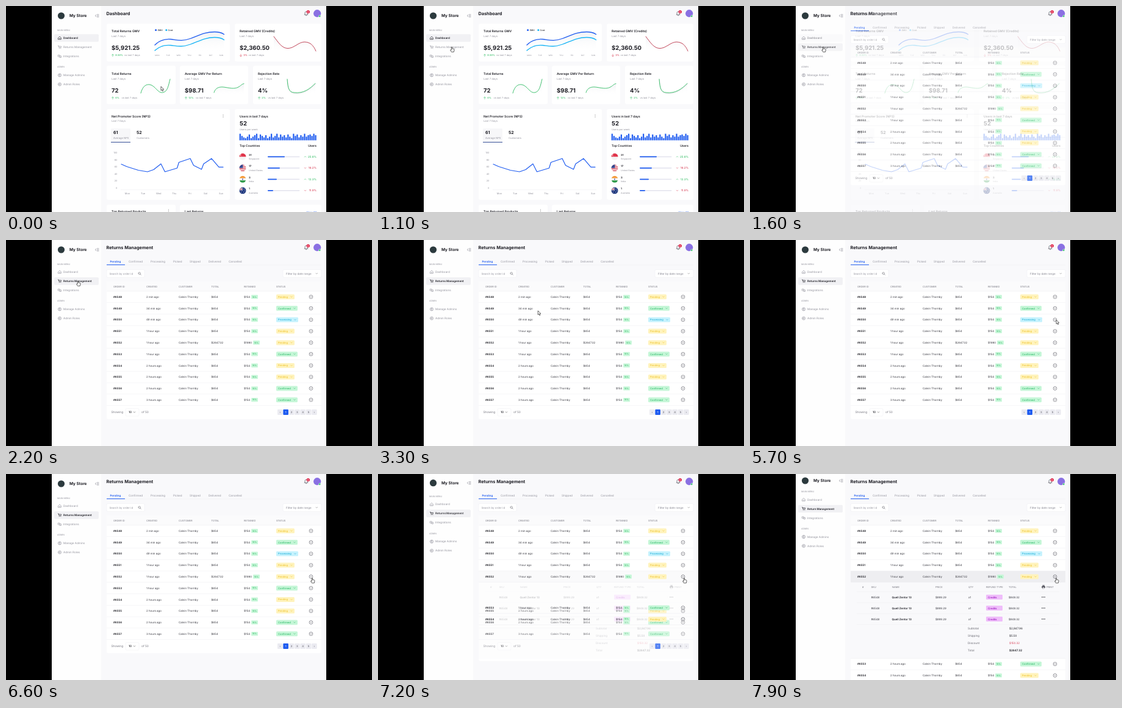
Write an HTML page that moves like this. It is 600 px wide and 338 px high and loops after 8 s.

```html
<!DOCTYPE html>
<html lang="en">
<head>
<meta charset="utf-8">
<title>Store returns dashboard</title>
<style>
html, body { margin: 0; width: 100%; height: 100%; overflow: hidden; background: #000; }
svg { display: block; width: 600px; height: 338px; }
text { font-family: Inter, Roboto, sans-serif; text-rendering: geometricPrecision; white-space: pre; }
</style>
</head>
<body>
<svg id="stage" viewBox="0 0 600 338"></svg>
<script>
const INK = '#1d1d24', GREY = '#92929c', BLUE = '#1f5cf0', GREEN = '#3cc06c', RED = '#d8435a';
const PERSON = 'Calvin Thornby', PRODUCT = 'Quell Zentor 13';

// y is the vertical middle of the capitals
const text = (x, y, s, size = 4.5, fill = INK, weight = 400, anchor = 'start') =>
  `<text x="${x}" y="${y + size * .36}" font-size="${size}" fill="${fill}" font-weight="${weight}" text-anchor="${anchor}">${s}</text>`;
const rect = (x, y, w, h, fill, r = 0, more = '') =>
  `<rect x="${x}" y="${y}" width="${w}" height="${h}" rx="${r}" fill="${fill}" ${more}/>`;
const line = (d, stroke, w = .6, more = '') =>
  `<path d="${d}" fill="none" stroke="${stroke}" stroke-width="${w}" stroke-linecap="round" stroke-linejoin="round" ${more}/>`;
const dot = (x, y, r, fill, more = '') => `<circle cx="${x}" cy="${y}" r="${r}" fill="${fill}" ${more}/>`;
const group = (id, body) => `<g id="${id}">${body}</g>`;
const card = (x, y, w, h) => rect(x, y, w, h, '#fff', 3);
const rule = (y, x = 165, w = 352) => rect(x, y - .25, w, .5, '#ececf0');
const chevron = (x, y, c, up = 1) => line(`M${x - 1.3} ${y - .6 * up}l1.3 ${1.3 * up}l1.3 ${-1.3 * up}`, c, .55);
const kebab = (x, y) => [-2, 0, 2].map(d => dot(x, y + d, .5, '#777')).join('');

// ---------- sidebar ----------
const icons = {
  home: 'M-2.3 -.4L0 -2.4L2.3 -.4V2.3H-2.3ZM-.8 1H.8',
  cart: 'M-2.7 -2.3H-1.7L-1 1H2L2.5 -1.3H-1.5M-.8 2.2h.1M1.8 2.2h.1',
  link: 'M-2.4 -2H0V.6H-2.4ZM0 -.6H2.4V2H0V.6',
  user: 'M-2.6 0a2.6 2.6 0 1 0 5.2 0a2.6 2.6 0 1 0 -5.2 0M-1.4 1.8Q0 0 1.4 1.8M-.8 -.7a.8 .8 0 1 0 1.6 0a.8 .8 0 1 0 -1.6 0',
  role: 'M-2.6 0a2.6 2.6 0 1 0 5.2 0a2.6 2.6 0 1 0 -5.2 0M-1 0a1 1 0 1 0 2 0a1 1 0 1 0 -2 0'
};
const icon = (k, x, y, c) => line(icons[k], c, .65, `transform="translate(${x} ${y})"`);
const item = (k, y, s) => icon(k, 88, y, GREY) + text(94, y, s, 4.6, GREY);
const active = (k, y, label) => rect(79, y - 6.3, 73, 12.6, '#f1f1f4', 2) + icon(k, 88, y, INK) + label;
const bold = (y, s) => text(94, y, s, 4.5, INK, 600);

const sidebar = rect(75, 0, 81, 338, '#fefefe') +
  group('brand', dot(90.5, 16, 5.6, '#2c3a3e') + text(104, 16, 'My Store', 6.5, INK, 700) +
    line('M147.8 14.4L146.4 16L147.8 17.6M149.4 14h2.6M149.4 16h2.6M149.4 18h2.6', '#70707c', .6)) +
  group('menu', text(84, 39.3, 'MAIN MENU', 3.6, GREY) + text(84, 100, 'ADMIN', 3.6, GREY) +
    item('link', 82.5, 'Integrations') + item('user', 113.5, 'Manage Admins') + item('role', 128.5, 'Admin Roles') +
    group('onDash', active('home', 52.5, bold(52.5, 'Dashboard')) + item('cart', 67.5, 'Returns Management')) +
    group('onReturns', item('home', 52.5, 'Dashboard') +
      active('cart', 67.5, group('plural', bold(67.5, 'Returns Management')) + group('single', bold(67.5, 'Return Management')))));

const header = line('M489.2 14.2H495M490 14V11.6Q490 9.2 492.1 9.2T494.2 11.6V14M491.4 15.6h1.4', '#55555f', .7) +
  dot(495.3, 9.6, 2.7, '#e0284a') + text(495.3, 9.6, '6', 3.2, '#fff', 600, 'middle') +
  dot(510.2, 12.2, 6.1, '#8a70e2') + dot(514.2, 16.7, 1.6, '#35c36b', 'stroke="#fff" stroke-width=".5"');

// ---------- dashboard ----------
function stat(x, y, title, value, pct, up, gap) {
  const c = up ? GREEN : RED, d = up ? 1 : -1, by = y + 40;
  return text(x, y, title, 5.1, INK, 600) + text(x, y + 8, 'Last 7 days', 4.3, GREY) +
    text(x, y + 27.2, value, 9.5, INK, 700) +
    line(`M${x + 2} ${by + 1.8}v-3.6M${x + .6} ${by - .4 * d}l1.4 ${-1.4 * d}l1.4 ${1.4 * d}`, c, .6) +
    text(x + 6.3, by, pct, 4, c, 500) + text(x + gap, by, 'vs last 7 days', 4, GREY);
}
const shade = (d, x0, x1, y) => `<path d="${d}L${x1} ${y}H${x0}Z" fill="url(#fade)"/>`;
const curve = (d, c, x0, x1, y, w = .95) => shade(d, x0, x1, y) + line(d, c, w);
const spread = (names, x, step, y, size) =>
  names.map((s, i) => text(x + i * step, y, s, size, GREY, 400, 'middle')).join('');
const days = ['Mon', 'Tue', 'Wed', 'Thu', 'Fri', 'Sat', 'Sun'];

const gmv = 'M244 64C252 56 260 53.5 270 54.5S288 58.5 302 53.5S326 42.5 342 42.5Q352 42.5 357.5 46.5';
const cost = 'M244 73C252 65.5 260 63.5 270 64.5S288 68 302 63S326 51.5 342 51.5Q352 51.5 357.5 55.5';
const overview = card(165, 29, 202, 62) + stat(173, 41, 'Total Returns GMV', '$5,921.25', '8.59%', 1, 21) +
  dot(245.6, 39.4, 1.5, BLUE) + text(248.4, 39.4, 'GMV', 3.6, INK, 500) +
  dot(262.8, 39.4, 1.5, '#17b4f5') + text(265.6, 39.4, 'Cost', 3.6, INK, 500) +
  curve(gmv, BLUE, 244, 357.5, 76, 1.3) + line(cost, '#17b4f5', 1.3) +
  spread(days.map(d => d.toUpperCase()), 248, 17.5, 81, 3) +
  card(375, 29, 142, 62) + stat(383, 41, 'Retained GMV (Credits)', '$2,360.50', '3%', 0, 14.5) +
  curve('M439 50C446 59 452 69.5 462 69.5S480 59 489 59S504 64 508 74', '#bd3a50', 439, 508, 76) +
  card(165, 98, 113, 63) + stat(173, 111, 'Total Returns', '72', '6%', 1, 16.5) +
  curve('M221 143C224 131 230 128 236 129C245 131 249 143.5 257 142S266 131 269 120', GREEN, 221, 269, 147) +
  card(285, 98, 112, 63) + stat(293, 111, 'Average GMV Per Return', '$98.71', '12%', 1, 18) +
  curve('M341 142C343 134 350 132 358 133.2S374 136.5 380 133.5S386 128 390 127.5', GREEN, 341, 390, 147) +
  card(405, 98, 112, 63) + stat(413, 111, 'Rejection Rate', '4%', '2%', 1, 16.5) +
  line('M461.5 121C462.5 136 464 142.5 472 143.2C488 145 498 137 507.5 128', '#c9c9cf', .7) +
  curve('M461 120C462 135 464 141.3 472 142C488 144 498 136 507 127', GREEN, 461, 507, 147);

const nps = card(165, 169, 202, 149) + text(173, 181, 'Net Promoter Score (NPS)', 5.1, INK, 600) +
  text(173, 188.4, 'Last 7 Days', 4.2, GREY) + kebab(356, 180.5) +
  rect(172, 201, 32, 22.5, '#f7f7f9', 1) + rect(172, 223, 32, .9, '#24408e') +
  text(176, 207.5, '61', 7, INK, 700) + text(176, 216.3, 'Average NPS', 4.1, GREY) +
  text(214, 207.5, '52', 7, INK, 700) + text(214, 216.3, 'Customers', 4.1, GREY) +
  [100, 80, 60, 40, 20, 0].map((n, i) => text(182.5, 241 + i * 11.5, n, 3.8, GREY, 400, 'end')).join('') +
  rect(188, 301, 170, .4, '#e6e6ea') + spread(days, 199, 25.6, 308, 4) +
  line('M189 259.5L198 263.5L217 269.5L232 272L242 268.5L254 259L260.5 272L280.5 266L283.5 256.5L302 250.2L307.5 261.5L320.5 268L324 259L337 250.3L349 264.3H356', BLUE, 1.2);

const flags = [
  rect(-6, -6, 12, 12, '#f4f4f4') + rect(-6, -6, 12, 6, '#e0344a') + dot(-2.6, -2.7, 1.6, '#fff') + dot(-1.9, -2.7, 1.5, '#e0344a'),
  rect(-6, -6, 12, 12, '#fff') + [0, 1, 2, 3].map(i => rect(-6, -5.5 + i * 3.1, 12, 1.5, '#d33a4c')).join('') + rect(-6, -6, 6.3, 6, '#34488f'),
  rect(-6, -6, 12, 12, '#fff') + rect(-6, -6, 12, 4.2, '#f49a3a') + rect(-6, 1.8, 12, 4.2, '#2f9a4a') + dot(0, 0, 1.1, '#4a5aa8'),
  rect(-6, -6, 12, 12, '#213a80') + line('M-5.5 -4.5L0 0M0 -4.5L-5.5 0M-2.7 -5.5V0M-5.5 -2.3H0', '#fff', .9) +
    line('M-2.7 -5.5V0M-5.5 -2.3H0', '#d8354a', .5) + [[2.5, -2.5], [3.6, .2], [1.8, 2.8], [-2.4, 2.5]].map(([x, y]) => dot(x, y, .5, '#fff')).join('')
];
const countries = [[31, 'Singapore', 28, '25.8%', 1], [17, 'United States', 20, '16.2%', 0], [3, 'India', 15, '12.3%', 1], [1, 'Australia', 9, '11.9%', 0]]
  .map(([n, name, w, pct, up], i) => {
    const y = 247.3 + i * 18.5, c = up ? GREEN : RED;
    return `<g transform="translate(388 ${y})" clip-path="url(#round)">${flags[i]}</g>` +
      text(398, y - 3.2, n, 4.3, INK, 600) + text(398, y + 3.7, name, 3.6, GREY) +
      rect(429, y - .9, 52.5, 1.8, '#e6e6f0', .9) + rect(429, y - .9, w, 1.8, BLUE, .9) +
      chevron(490.5, y, c, up ? -1 : 1) + text(509, y, pct, 4.5, c, 500, 'end');
  }).join('');
const bars = [...'964358357938647359469485748539684759578697']
  .map((h, i) => { const v = h * 1.2; return rect(382.7 + i * 3.02, 220.4 - v, 2.2, v, BLUE); }).join('');
const users = card(375, 169, 142, 149) + text(383, 181, 'Users in last 7 days', 5, INK, 600) +
  text(383, 192.2, '52', 9.5, INK, 700) + text(383, 203, 'Users per week', 4, GREY) + bars +
  text(383, 229.7, 'Top Countries', 4.9, INK, 600) + text(509, 229.7, 'Users', 4.9, INK, 600, 'end') + countries;
const below = card(165, 326, 113, 30) + text(173, 337, 'Top Returned Products', 5.1, INK, 600) + kebab(266.5, 336) +
  card(285, 326, 232, 30) + text(293, 337, 'Last Returns', 5.1, INK, 600) + text(509, 338, 'View All', 4.3, BLUE, 500, 'end');

const page = (title, body) => rect(156, 0, 369, 338, '#f9f9fb') + text(164.5, 12.5, title, 7.3, INK, 700) + body;
const dashboard = page('Dashboard', overview + nps + users + below);

// ---------- returns ----------
const status = {
  P: ['Pending', 30, '#fff3bd', '#efc530'],
  C: ['Confirmed', 35, '#c5f6d7', '#31bb6b'],
  R: ['Processing', 36, '#c6f2fd', '#1fb0d8']
};
const rowY = i => 93.3 + i * 18.77;
const created = ['2 min ago', '34 min ago', '49 min ago', '1 hour ago', '1 hour ago', '1 hour ago', '2 hours ago', '2 hours ago', '2 hours ago', '3 hours ago'];
const cell = (x, y, s, c = '#33333b', w = 400) => text(x, y, s, 4.45, c, w);

function row(i) {
  const y = rowY(i), [name, w, bg, fg] = status['PCRPPCPPCC'[i]], big = i === 4, bx = big ? 405 : 402;
  const when = cell(230, y, created[i], '#33333b');
  return cell(176, y, '#' + (6548 + i), INK, 600) +
    (i === 5 ? group('whenA', when) + group('whenB', cell(230, y, '2 hours ago')) : when) +
    cell(283, y, PERSON) + cell(336.5, y, big ? '$2647.32' : '$654') + cell(390, y, big ? '$1980' : '$154') +
    rect(bx, y - 3.3, 11, 6.6, '#c9f7da', 1.2) + text(bx + 5.5, y, '16%', 3.5, '#35b868', 500, 'middle') +
    rect(443, y - 4, w, 8, bg, 1.5) + text(446, y, name, 4.1, fg, 500) + chevron(443 + w - 5, y, fg) +
    dot(500, y, 2.9, 'none', 'stroke="#55555e" stroke-width=".6"') + chevron(500, y, '#55555e') + rule(y + 9.4);
}
const rows = (a, b) => { let s = ''; for (let i = a; i <= b; i++) s += row(i); return s; };
const heads = (list, y, size) => list.map(([x, s]) => text(x, y, s, size, '#74747e')).join('');

const tabs = [[201, 'Confirmed'], [237, 'Processing'], [274, 'Picked'], [301, 'Shipped'], [332, 'Delivered'], [365, 'Cancelled']]
  .map(([x, s]) => text(x, 35.5, s, 4.6, GREY)).join('') +
  text(170.5, 35.5, 'Pending', 4.5, BLUE, 600) + rule(41) + rect(165, 40.2, 30, 1, BLUE);
const border = 'stroke="#ececf0" stroke-width=".5"';
const tools = rect(165, 48.5, 62, 13, '#fff', 2, border) + text(169.5, 55, 'Search by order id', 4.45, GREY) +
  line('M217 54.7a1.7 1.7 0 1 0 3.4 0a1.7 1.7 0 1 0 -3.4 0M220 56l1.3 1.3', '#66666f', .6) +
  rect(454, 48.5, 63, 13, '#fff', 2, border) + text(459, 55, 'Filter by date range', 4.5, GREY, 500) + chevron(509.3, 55, '#777');
const pager = ['‹', 1, 2, 3, 4, 5, '›'].map((s, i) => {
  const on = i === 1, x = 449.3 + i * 9.35;
  return rect(x - 4.3, 278, 8.6, 9, on ? BLUE : '#ebebf1', 1) + text(x, 282.5, s, 4.2, on ? '#fff' : '#666670', 500, 'middle');
}).join('');
const footer = text(172.5, 282.5, 'Showing', 4.8, '#74747e') + rect(196, 276.5, 22, 12.5, '#fff', 2, border) +
  text(201, 282.5, '10', 4.8, INK, 500) + chevron(210.5, 282.5, '#444') + text(222, 282.5, 'of 50', 4.8, '#74747e');

const lines = [202, 220, 238].map(y =>
  cell(198.5, y, '#6548') + cell(232.5, y, PRODUCT, INK, 600) + cell(304, y, '$999.29') + cell(358, y, 'x1') +
  rect(387, y - 4, 27, 8, '#efbdfa', 1.2) + text(390, y, 'Credits', 4.2, '#a326c4', 600) + cell(424, y, '$949.32') +
  [-2.2, 0, 2.2].map(d => dot(481 + d, y, .7, INK)).join('') + rule(y + 9, 175, 332)).join('');
const sums = [['Subtotal', '$2,847.96', INK], ['Shipping', '$5.50', INK], ['Discount', '$150.32', RED], ['Total', '$2647.32', INK]]
  .map(([k, v, c], i) => text(357, 253.3 + i * 11.9, k, 4.6, '#66666f') + text(425, 253.3 + i * 11.9, v, 4.6, c, i === 3 ? 600 : 400)).join('');
const detail = rect(165, 177.8, 352, 125, '#f9f9fb') +
  heads([[184, '#'], [198.5, 'SKU'], [233, 'NAME'], [304, 'PRICE'], [358, 'QTY'], [387, 'REFUND TYPE'], [424, 'TOTAL'], [486, 'PRINT']], 185.3, 4) +
  rect(478.3, 184, 5.6, 3, '#55555e', .6) + rect(479.4, 182.3, 3.4, 1.4, '#55555e') + rect(479.6, 186, 3, 2, '#fff', 0, 'stroke="#55555e" stroke-width=".4"') +
  rule(193, 175, 332) + lines + sums + rule(302.8);

const returns = page('Returns Management', tabs + tools +
  rect(165, 68, 352, 226, '#fff', 3, 'id="table"') + rect(165, 68, 352, 16, '#fbfbfc', 3) + rule(84) +
  heads([[176, 'ORDER ID'], [230, 'CREATED'], [283, 'CUSTOMER'], [336.5, 'TOTAL'], [390, 'RETAINED'], [443, 'STATUS']], 76.2, 4) +
  group('detail', detail + rect(165, 159, 352, 18.8, '#eeeef1')) + rows(0, 4) +
  group('tail', rows(7, 9) + footer + pager) + group('pushed', rows(5, 6)));

// ---------- pointer ----------
const outline = 'fill="#fff" stroke="#222" stroke-width=".7" stroke-linejoin="round"';
const pointer = group('arrow', `<path d="M0 0V6.6L1.5 5.3L2.6 7.7L3.7 7.2L2.7 4.9L4.7 4.8Z" ${outline}/>`) +
  group('hand', `<path d="M-.7 .6Q0 -.5 .7 .6V3L2 3.1L3.2 3.5Q4.2 3.7 4 5L3.3 8.4H-.6L-2.4 5.5Q-2.6 4.3 -.7 5.2Z" ${outline}/>`);

const $ = id => document.getElementById(id);
$('stage').innerHTML = `<defs><clipPath id="round"><circle r="5.5"/></clipPath>
  <linearGradient id="fade" x2="0" y2="1"><stop stop-color="#dfe1e8" stop-opacity=".45"/><stop offset="1" stop-color="#fff" stop-opacity="0"/></linearGradient></defs>` +
  rect(75, 0, 450, 338, '#fff') + group('dashboard', dashboard) + group('returns', returns) +
  sidebar + header + group('pointer', pointer);

// ---------- motion ----------
const LOOP = 8000, STEP = 100;
const path = [[0, 254, 132], [200, 254, 132], [900, 121, 67], [1400, 121, 67], [2000, 118, 67], [2600, 118, 67],
  [4200, 472.5, 187.5], [4700, 472.5, 187.5], [5500, 502, 131], [5900, 502, 131], [6600, 502, 170.5], [LOOP, 502, 170.5]];
const ease = (t, from, span) => { const k = Math.min(1, Math.max(0, (t - from) / span)); return k * k * (3 - 2 * k); };
const fade = (id, o) => $(id).setAttribute('opacity', o);
const move = (id, x, y) => $(id).setAttribute('transform', `translate(${x} ${y})`);

function draw(t) {
  const swap = ease(t, 1400, 300), open = ease(t, 7100, 300);
  fade('returns', swap);
  fade('onReturns', swap);
  fade('onDash', 1 - swap);

  move('brand', 0, -5 * open);
  move('menu', 0, -10.5 * open);
  $('table').setAttribute('height', 226 + 50 * open);
  move('pushed', 0, 124.6 * open);
  for (const id of ['detail', 'single', 'whenB']) fade(id, open);
  for (const id of ['tail', 'plural', 'whenA']) fade(id, 1 - open);

  const i = path.findIndex((p, n) => t < path[n + 1][0]);
  const [t0, x0, y0] = path[i], [t1, x1, y1] = path[i + 1], k = ease(t, t0, t1 - t0);
  move('pointer', x0 + (x1 - x0) * k, y0 + (y1 - y0) * k);
  const hand = (t >= 800 && t < 2800) || t >= 6400;
  fade('hand', +hand);
  fade('arrow', +!hand);
}

const start = performance.now();
function tick() {
  const t = (performance.now() - start) % LOOP;
  draw(Math.floor(t / STEP) * STEP);
  requestAnimationFrame(tick);
}
draw(0);
requestAnimationFrame(tick);
</script>
</body>
</html>
```
